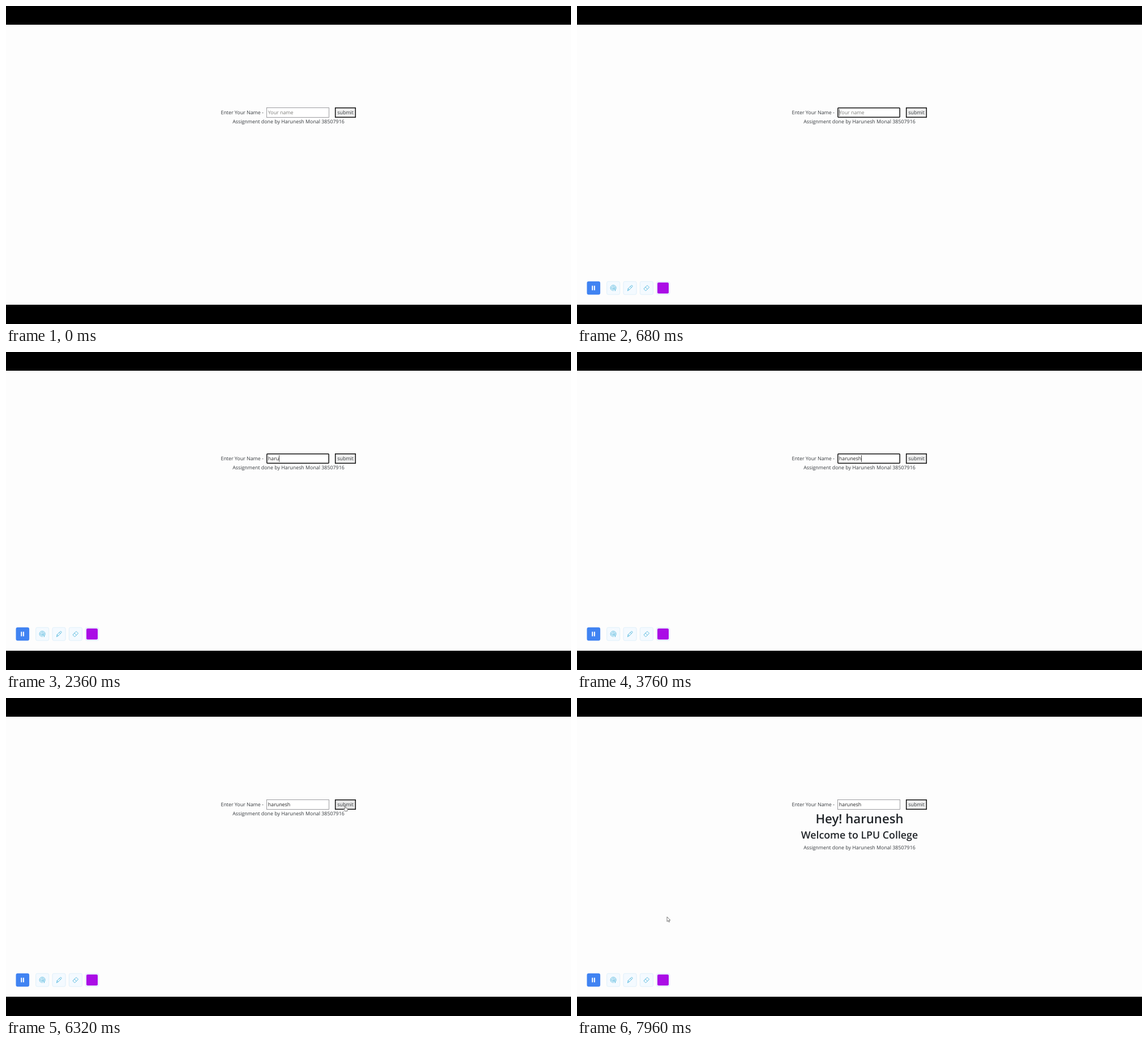
Animation of 998 by 561 pixels, one loop 8000 ms. Source, as an HTML page:

```html
<!DOCTYPE html>
<html lang="en">
<head>
<meta charset="utf-8">
<title>Name form</title>
<style>
  html, body { margin: 0; width: 100%; height: 100%; overflow: hidden; background: #000; }
  svg { display: block; width: 100%; height: 100%; }
  text { font: 8.85px "Open Sans", "Noto Sans", sans-serif; fill: #35393d; text-rendering: geometricPrecision; white-space: pre; }
  .mid { text-anchor: middle; }
  .heading { font-weight: 600; fill: #212529; }
  .tile { fill: #f4faff; stroke: #d9edf9; stroke-width: .8; }
  .icon { fill: none; stroke: #4fb5dc; stroke-width: .9; stroke-linecap: round; stroke-linejoin: round; }
  .cursor { fill: #fff; stroke: #444; stroke-width: .7; stroke-linejoin: round; }
</style>
</head>
<body>
<svg viewBox="0 0 998 561">
  <rect width="998" height="561"/>
  <rect y="33" width="998" height="494" fill="#fdfdfd"/>

  <text x="379.5" y="191">Enter Your Name -</text>
  <rect id="field" fill="#fff"/>
  <text id="hint" x="462.8" y="191" style="fill:#7c7c78">Your name</text>
  <text id="typed" x="462.8" y="191" style="fill:#222"></text>
  <rect id="caret" y="182" width=".8" height="12" fill="#222"/>
  <rect id="button" x="581.7" y="179.7" width="35.6" height="16.6" stroke="#111" stroke-width="1.5"/>
  <text class="mid" x="599.6" y="191">submit</text>

  <g id="greeting">
    <text class="mid heading" x="499" y="221" style="font-size:22.2px">Hey! harunesh</text>
    <text class="mid heading" x="499" y="248" style="font-size:17.8px">Welcome to LPU College</text>
  </g>
  <text id="credit" class="mid" x="499">Assignment done by Harunesh Monal 38507916</text>

  <g id="toolbar">
    <rect x="17.5" y="485.7" width="23.6" height="23.6" rx="3.2" fill="#4083f2"/>
    <path d="M27.3 493.5v8M30.9 493.5v8" stroke="#fff" stroke-width="2"/>
    <rect class="tile" x="52.7" y="486" width="23" height="23" rx="2.5"/>
    <rect class="tile" x="82.1" y="486" width="23" height="23" rx="2.5"/>
    <rect class="tile" x="111.4" y="486" width="23" height="23" rx="2.5"/>
    <rect class="tile" x="140.7" y="486" width="23" height="23" rx="2.5"/>
    <rect x="142" y="487.7" width="20" height="19.6" rx="2" fill="#aa0ce6"/>
    <g class="icon">
      <path d="M61.5 501.7a5 5 0 1 1 6-.6M62 499.6a3 3 0 1 1 4.8-.6M63.7 502.5v-5a.8 .8 0 0 1 1.6 0v2.3l2.4 .8-.5 2"/>
      <path d="M89.5 502l.8-3.4 5.3-5.3q1-1 2 0t0 2l-5.3 5.3zM94.3 494.7l2 2M90.3 498.6l2 2"/>
      <path d="M118.6 498.2l4.7-4.7q.8-.8 1.6 0l2 2q.8 .8 0 1.6l-4.7 4.7q-.8 .8-1.6 0l-2-2q-.8-.8 0-1.6zM120.8 496l3.6 3.6"/>
    </g>
  </g>

  <path id="arrow" class="cursor" d="M0 0v8.4l2-1.8 1.3 2.8 1.3-.6-1.3-2.7h2.6z"/>
  <path id="hand" class="cursor" d="M-.8 5V.8a.8 .8 0 0 1 1.6 0v3l3 .8q.8 .3 .7 1.3l-.6 3.6h-4.3l-2.6-3.3q.6-1.2 2.2 .2z"/>
</svg>
<script>
const LOOP = 8000;
const NAME = 'harunesh';
const KEY_TIMES = [1400, 1700, 1950, 2200, 2560, 2850, 3150, 3400];
const FOCUS = 460, MOVE = 5400, HOVER = 5880, CLICK = 6200, GREET = 6440, LEAVE = 6760;

// Pointer stops: time, x, y
const POINTER = [[MOVE, 515, 187], [5620, 556, 172], [HOVER, 599, 190], [LEAVE, 599, 190], [7560, 159, 386]];

const el = id => document.getElementById(id);
const show = (id, on) => el(id).setAttribute('visibility', on ? 'visible' : 'hidden');
const set = (id, attrs) => {
  for (const key in attrs) el(id).setAttribute(key, attrs[key]);
};
const clamp = v => Math.min(1, Math.max(0, v));
const ease = v => v * v * (3 - 2 * v);

function pointerAt(t) {
  let [, x, y] = POINTER[0];
  for (let i = 1; i < POINTER.length; i++) {
    const [start] = POINTER[i - 1], [end, toX, toY] = POINTER[i];
    const p = ease(clamp((t - start) / (end - start)));
    x += (toX - x) * p;
    y += (toY - y) * p;
  }
  return [x, y];
}

function draw(t) {
  const focused = t >= FOCUS && t < CLICK;
  const pressed = KEY_TIMES.filter(time => time <= t);
  const lastInput = pressed.length ? pressed[pressed.length - 1] : FOCUS;
  const greeted = t >= GREET;

  el('typed').textContent = NAME.slice(0, pressed.length);
  show('hint', !pressed.length);
  set('field', focused
    ? { x: 460.8, y: 179.8, width: 109.4, height: 16.4, rx: 1, stroke: '#111', 'stroke-width': 1.5 }
    : { x: 460.5, y: 179.5, width: 110, height: 17, rx: 0, stroke: '#858589', 'stroke-width': .8 });
  const width = pressed.length ? el('typed').getComputedTextLength() : 0;
  set('caret', { x: 462.8 + width });
  show('caret', focused && (t - lastInput) % 1000 < 500);

  const hovering = t >= HOVER - 80 && t < LEAVE + 80;
  set('button', { fill: hovering ? '#e7e7e7' : '#efefef' });
  show('greeting', greeted);
  set('credit', { y: greeted ? 267 : 207 });
  set('toolbar', { opacity: clamp((t - 300) / 160) });

  const [x, y] = pointerAt(t);
  for (const id of ['arrow', 'hand']) set(id, { transform: `translate(${x} ${y})` });
  show('hand', hovering);
  show('arrow', t >= MOVE && !hovering);
}

function frame() {
  draw(performance.now() % LOOP);
  requestAnimationFrame(frame);
}
frame();
</script>
</body>
</html>
```
